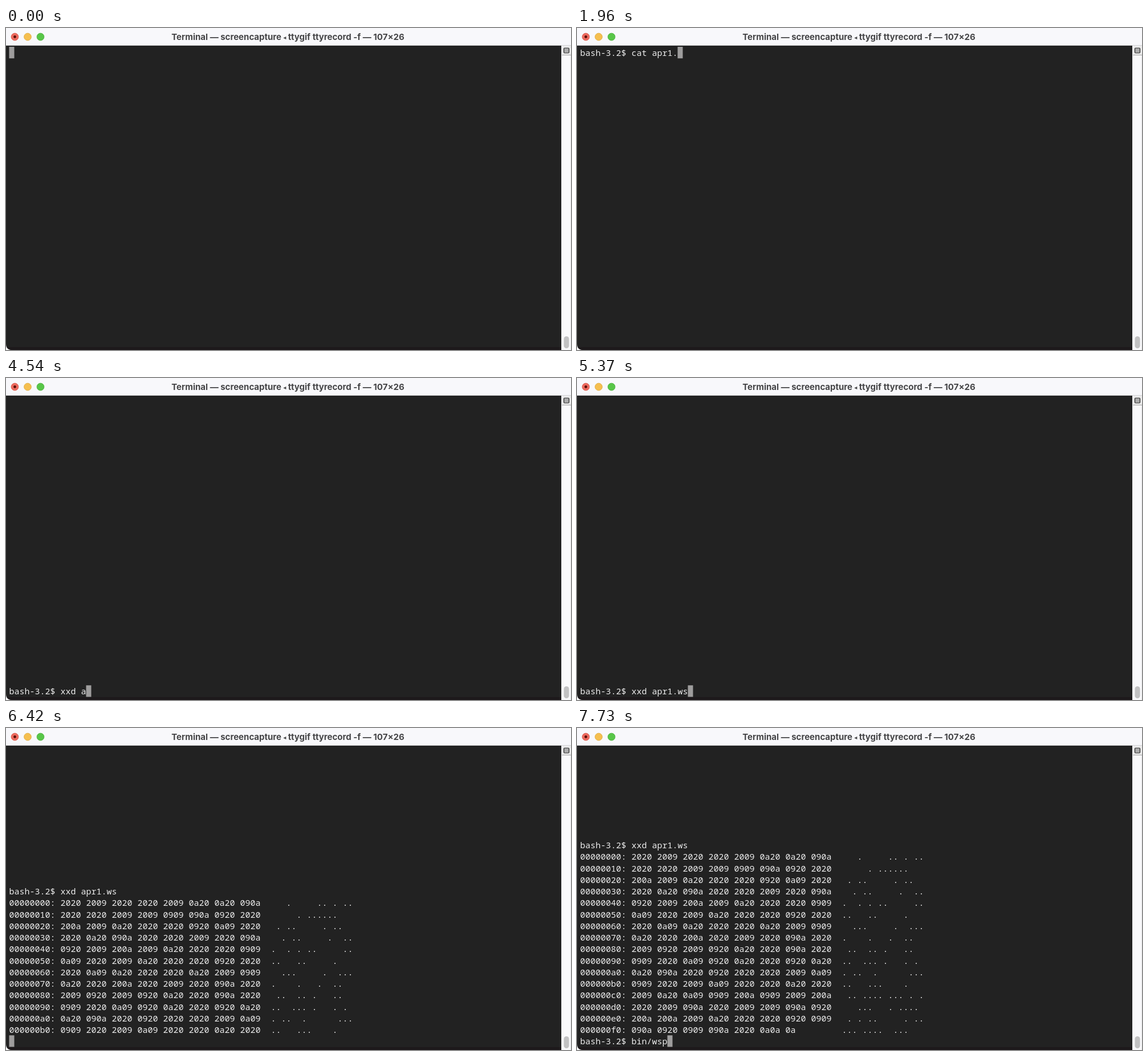
Recreate the animation shown at these times as an HTML page. Size 991 px wide and 565 px high, loop 8000 ms.

```html
<!DOCTYPE html>
<html lang="en">
<head>
<meta charset="utf-8">
<title>Terminal</title>
<style>
  html, body { margin: 0; width: 991px; height: 565px; overflow: hidden; background: #fff; }
  #win { position: relative; width: 991px; height: 565px; overflow: hidden; }
  svg { position: absolute; inset: 0; }
  #title {
    position: absolute; left: 0; top: 0; width: 989px; text-align: center; white-space: pre;
    font: 700 15px/31px Inter, sans-serif; color: #454547;
  }
  #title span { font-size: 9px; vertical-align: 1px; line-height: 1; }
  .row {
    position: absolute; left: 5.5px; height: 20px; white-space: pre; color: #ececec;
    font: 300 15px/20px "Noto Sans Mono", monospace; font-variant-ligatures: none;
  }
</style>
</head>
<body>
<div id="win">
  <svg width="991" height="565">
    <rect width="991" height="565" fill="#f9f9fb"/>
    <rect width="991" height="31" rx="3" fill="#f8f8fb"/>
    <path d="M0 31H974V565H11Q0 565 0 554Z" fill="#222"/>
    <path d="M1.5 560H974V565H11Q4 565 1.5 560Z" fill="#1d191b"/>
    <path d="M990.5 48V565" stroke="#e9e9eb"/>
    <rect x="975" y="31" width="16" height="16.5" fill="#ececec"/>
    <path d="M975 47.5H991" stroke="#a5a5a5"/>
    <path d="M0 30.5H991" stroke="#000" stroke-opacity=".15"/>
    <rect x="978.5" y="35.5" width="9" height="8" rx="1" fill="#fff" stroke="#2e2e2e" stroke-width="1.3"/>
    <path d="M979 38.2H987M979 40.8H987" stroke="#2e2e2e"/>
    <rect x="978.5" y="541" width="9" height="21" rx="4.5" fill="#c1c1c2"/>
    <g stroke-width=".8">
      <circle cx="15.5" cy="15.5" r="6.4" fill="#ed6a5e" stroke="#d5564a"/>
      <circle cx="38" cy="15.5" r="6.4" fill="#f5bf4f" stroke="#dca73c"/>
      <circle cx="60.5" cy="15.5" r="6.4" fill="#58c648" stroke="#49ae3b"/>
    </g>
    <circle cx="15.5" cy="15.5" r="2.4" fill="#5a0d08"/>
    <rect id="cursor" width="9" height="20.25" fill="#9e9d9d"/>
  </svg>
  <div id="title">Terminal — screencapture <span>◂</span> ttygif ttyrecord -f — 107×26</div>
</div>
<script>
const LOOP = 8000, ROWS = 26, TOP = 33, LEFT = 5.5, CELL_W = 9, CELL_H = 20.25;
const PROMPT = 'bash-3.2$ ';

const hex = [
  '2020 2009 2020 2020 2009 0a20 0a20 090a',
  '2020 2020 2009 2009 0909 090a 0920 2020',
  '200a 2009 0a20 2020 2020 0920 0a09 2020',
  '2020 0a20 090a 2020 2020 2009 2020 090a',
  '0920 2009 200a 2009 0a20 2020 2020 0909',
  '0a09 2020 2009 0a20 2020 2020 0920 2020',
  '2020 0a09 0a20 2020 2020 0a20 2009 0909',
  '0a20 2020 200a 2020 2009 2020 090a 2020',
  '2009 0920 2009 0920 0a20 2020 090a 2020',
  '0909 2020 0a09 0920 0a20 2020 0920 0a20',
  '0a20 090a 2020 0920 2020 2020 2009 0a09',
  '0909 2020 2009 0a09 2020 2020 0a20 2020',
  '2009 0a20 0a09 0909 200a 0909 2009 200a',
  '2020 2009 090a 2020 2009 2009 090a 0920',
  '200a 200a 2009 0a20 2020 2020 0920 0909',
  '090a 0920 0909 090a 2020 0a0a 0a'
];
const dump = hex.map((row, i) => {
  const ascii = row.replace(/ /g, '').replace(/../g, b => b === '20' ? ' ' : '.');
  return `${(i * 16).toString(16).padStart(8, '0')}: ${row.padEnd(39)}  ${ascii}`;
});

const steps = [];
// The cursor always sits at the end of the last line.
const show = (time, lines, atBottom) =>
  steps.push({ time, lines, top: atBottom ? ROWS - lines.length : 0 });
const type = (cmd, times, before, atBottom) =>
  times.forEach((t, i) => show(t, [...before, PROMPT + cmd.slice(0, i + 1)], atBottom));

show(0, ['']);
type('cat apr1.ws', [890, 1140, 1220, 1310, 1490, 1600, 1710, 1820, 1960, 2110, 2310], []);
show(3150, [PROMPT + 'cat apr1.ws', '']);
show(3250, [''], true);
type('xxd apr1.ws', [3820, 3980, 4170, 4410, 4540, 4690, 4750, 4910, 5020, 5160, 5370], [], true);
const xxd = PROMPT + 'xxd apr1.ws';
show(6320, [xxd, ''], true);
show(6420, [xxd, ...dump.slice(0, 12), ''], true);
type('bin/wsp', [6860, 6900, 6940, 7210, 7410, 7590, 7730], [xxd, ...dump], true);

const win = document.getElementById('win');
const cursor = document.getElementById('cursor');
const rows = Array.from({ length: ROWS }, (_, r) => {
  const row = document.createElement('div');
  row.className = 'row';
  row.style.top = TOP + Math.round(r * CELL_H) + 'px';
  return win.appendChild(row);
});
let shown;

function draw({ lines, top }) {
  const last = lines.length - 1;
  rows.forEach((row, r) => { row.textContent = lines[r - top] ?? ''; });
  cursor.setAttribute('x', LEFT + lines[last].length * CELL_W);
  cursor.setAttribute('y', TOP + (top + last) * CELL_H);
}

function tick() {
  const t = performance.now() % LOOP;
  const step = steps.findLast(s => s.time <= t);
  if (step !== shown) draw(shown = step);
  requestAnimationFrame(tick);
}
tick();
</script>
</body>
</html>
```
